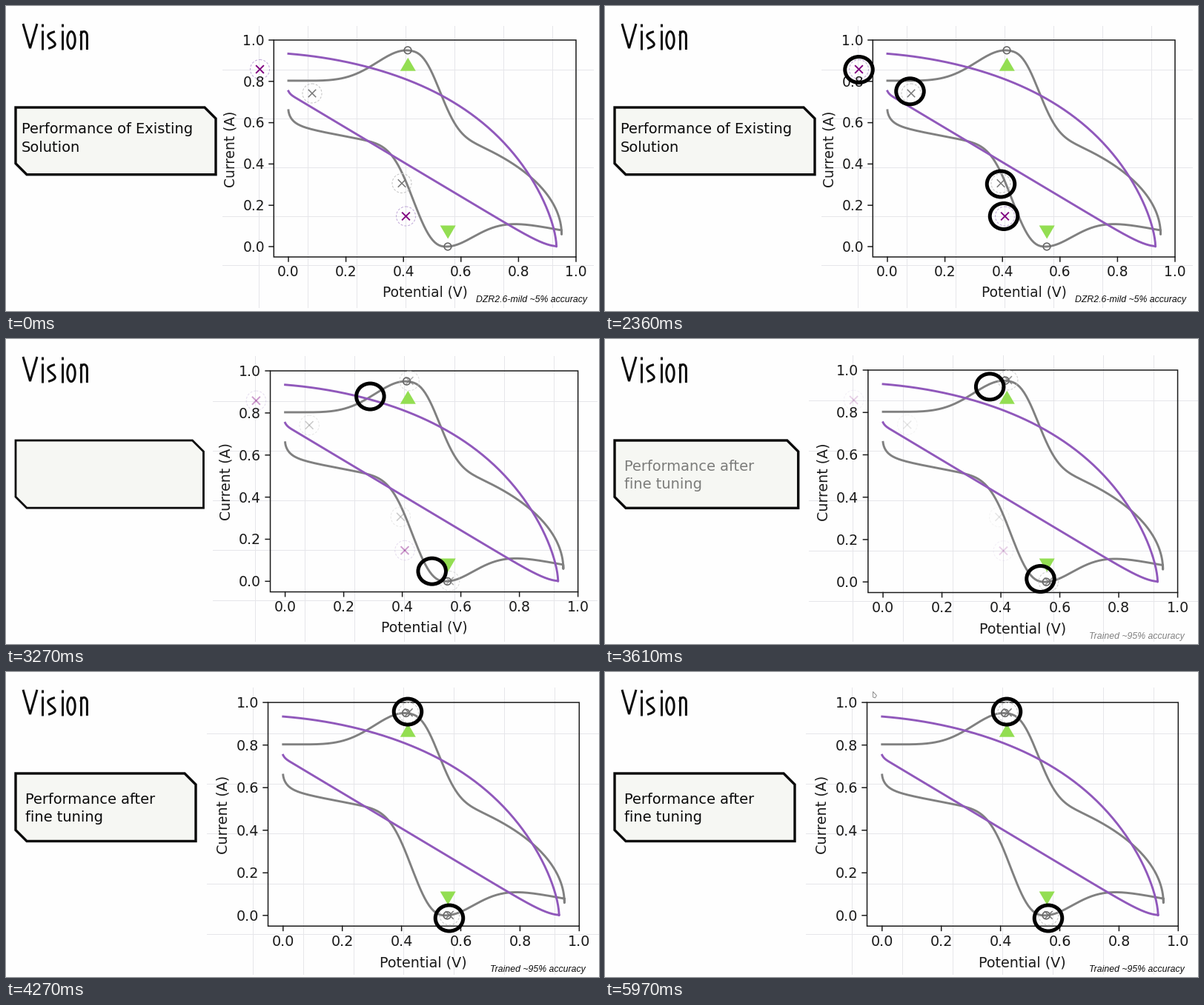
Animation of 800 by 412 pixels, one loop 6000 ms. Source, as a matplotlib script:

```python
import numpy as np
import matplotlib.pyplot as plt
from matplotlib.animation import FuncAnimation
from matplotlib.patches import Circle, Ellipse, Polygon, Rectangle
from matplotlib.transforms import Affine2D

W, H, STEP, FRAMES = 800, 412, 30, 200
PT = 0.72  # points per pixel at 100 dpi
GRAY, PURPLE, INK, LIME = "#808080", "#9058bb", "#0b0b0b", "#93de52"
EM = 18.6  # chart font size in pixels
X0, Y0, UX, UY = 381, 325, 388, 279  # chart zero point and unit lengths

fig = plt.figure(figsize=(W / 100, H / 100), dpi=100, facecolor="#fefefe")
ax = fig.add_axes([0, 0, 1, 1])
ax.set_xlim(0, W)
ax.set_ylim(H, 0)
ax.axis("off")

zoom = Affine2D()
chart = zoom + ax.transData


def lerp(a, b, p):
    return a + (b - a) * p


def ramp(t, start, end):
    return min(1.0, max(0.0, (t - start) / (end - start)))


def glide(t, start=2520, length=1755, rise=0.155):
    """Short acceleration followed by a long parabolic slow-down."""
    u = ramp(t, start, start + length)
    return u * u / rise if u < rise else 1 - (1 - u) ** 2 / (1 - rise)


def stroke(x, y, color, width, z=2, tr=None, **kw):
    return ax.plot(x, y, color=color, lw=width * PT, zorder=z,
                   transform=tr or ax.transData, **kw)[0]


def label(x, y, s, px, tr=None, **kw):
    kw = {"family": "DejaVu Sans", "va": "baseline", "color": INK, **kw}
    return ax.text(x, y, s, fontsize=px * PT, transform=tr or ax.transData,
                   zorder=3, **kw)


def note(x, y, s):
    return label(x, y, s, 12.2, ha="right", family="Liberation Sans",
                 style="italic")


def shape(patch, z):
    patch.set_zorder(z)
    return ax.add_patch(patch)


def title():
    """The word Vision in narrow pen strokes."""
    top, mid, base = 33, 46, 59

    def pen(x, y):
        stroke(x, y, INK, 3, solid_capstyle="butt", solid_joinstyle="miter")

    pen([23, 32.5, 42], [24, base - 2, 24])
    for x in (49, 75.5):
        pen([x, x], [top, base])
        pen([x, x], [24, 28])
    a = np.linspace(0.4, 3 * np.pi - 0.4, 60)
    pen(61.5 + 4.8 * np.cos(a), mid - 11.5 * np.cos(a / 3))
    a = np.linspace(0, 2 * np.pi, 60)
    pen(88 + 5.2 * np.cos(a), mid + 11.5 * np.sin(a))
    pen([101, 101], [top, base])
    a = np.linspace(0, np.pi, 30)
    pen(np.append(105.2 - 4.2 * np.cos(a), 109.4),
        np.append(40 - 5.5 * np.sin(a), base))


title()

# Panel and captions
panel = shape(Polygon([(0, 0)] * 6, fc="#f6f7f3", ec=INK), 1)
old_text = [label(21, 172.3, "Performance of Existing", 19.4),
            label(21, 196.8, "Solution", 19.4),
            note(784, 400, "DZR2.6-mild ~5% accuracy")]
new_text = [label(25.5, 177.5, "Performance after", 19.4),
            label(25.5, 202, "fine tuning", 19.4),
            note(782, 405, "Trained ~95% accuracy")]

# Background grid
GRID_X = 341 + 66 * np.arange(7)
GRID_Y = 86.2 + 65.9 * np.arange(5)
columns = [stroke([], [], "#e6e6ea", 1, 0.5) for _ in GRID_X]
rows = [stroke([], [], "#e6e6ea", 1, 0.5) for _ in GRID_Y]

# Chart frame, ticks and labels
EDGE = "#1a1a1a"
shape(Rectangle((361.3, 46), 407.7, 293, fill=False, ec=EDGE, lw=1.5 * PT,
                transform=chart, snap=False), 2.5)
words = []
for v in np.arange(6) / 5:
    x, y = X0 + UX * v, Y0 - UY * v
    stroke([x, x], [339, 345], EDGE, 1.5, tr=chart, snap=False)
    stroke([355, 361], [y, y], EDGE, 1.5, tr=chart, snap=False)
    words += [label(x, 365, f"{v:.1f}", EM, chart, ha="center", color=EDGE),
              label(349, y + 6.8, f"{v:.1f}", EM, chart, ha="right",
                    color=EDGE)]
words += [label(565, 392.3, "Potential (V)", EM, chart, ha="center",
                color=EDGE),
          label(303, 193, "Current (A)", EM, chart, ha="center", va="center",
                rotation=90, color=EDGE)]


# Current as a function of potential, forward and return sweeps
def bell(x, mid, left, right):
    """Lopsided bell; each side is (width, power)."""
    d = x - mid
    w, n = (np.where(d < 0, a, b) for a, b in zip(left, right))
    return np.exp(-np.abs(d / w) ** n)


def gray_forward(x):
    floor = np.where(x < 0.43, 0.124, -0.02)
    peak = floor + (0.333 - floor) * bell(x, 0.43, (0.165, 2), (0.1185, 2.5))
    return 0.079 + 0.6 * np.sqrt(1 - (x / 0.95) ** 2) + peak


def gray_back(x):
    base = 0.585 - 0.26 * x - np.where(x < 0.549, 0, 0.259)
    dip = 1 - bell(x, 0.549, (0.1366, 2.5), (0.158, 2))
    return base * dip + 0.075 * np.exp(-17 * x ** 0.7)


def purple_forward(x):
    r = x / 0.932
    return 0.934 * (1 - 0.22 * r - 0.78 * r * r) ** (0.5 + 0.1 * r ** 4)


def purple_back(x):
    return (0.741 - 0.831 * x + 0.0355 * (x / 0.932) ** 20
            + 0.012 * np.exp(-x / 0.006))


sweep = (1 - np.cos(np.linspace(0, np.pi, 200))) / 2
for forward, back, end, color in ((gray_forward, gray_back, 0.95, GRAY),
                                  (purple_forward, purple_back, 0.932, PURPLE)):
    x = end * sweep
    stroke(X0 + UX * np.append(x, x[::-1]),
           Y0 - UY * np.append(forward(x), back(x[::-1])),
           color, 2.9, 2.2, chart, solid_joinstyle="round")
for x, y in ((542, 59.8), (596, 325)):
    shape(Circle((x, y), 4.8, fill=False, ec="#666666", lw=1.6 * PT,
                 transform=chart), 2.6)


def cross(x, y, color="#777777", halo="#c4c4c4", width=1.5):
    """An x mark inside a dashed circle."""
    arm = np.array([-4.7, 4.7])
    arms = [stroke(x + arm, y + s * arm, color, width, 2.8, chart)
            for s in (1, -1)]
    ring = Circle((x, y), 13, fill=False, ec=halo, lw=PT, ls=(0, (3, 2)),
                  transform=chart)
    return arms + [shape(ring, 2.7)]


violet = ("#800080", "#c0a8d8", 1.9)
old_marks = (cross(342.5, 85.5, *violet) + cross(539.5, 284, *violet)
             + cross(413, 118) + cross(534, 239.5))
new_marks = cross(545.5, 59.2) + cross(599, 324.6)


def arrow(x, tip, base):
    shape(Polygon([(x, tip), (x - 10.5, base), (x + 10.5, base)],
                  fc=LIME, ec="none"), 4)


arrow(542.3, 69.8, 87.7)
arrow(596.2, 314.5, 296.5)

# Highlight rings: start, and end for those that travel
ROUTES = [((342.5, 86), None), ((411.5, 115.3), (542, 53.6)),
          ((534, 240.5), None), ((538, 284), (598, 332.5))]
rings = [shape(Ellipse(a, 37.5, 35, fill=False, ec="black", lw=5 * PT), 5)
         for a, _ in ROUTES]

pointer = shape(Polygon([(361.5, 26.5), (361.5, 34), (364.5, 35),
                         (366.4, 31.8)], fc="white", ec="#777777",
                        lw=0.8 * PT), 6)


def fade(items, alpha):
    for item in items:
        item.set_alpha(alpha)
        item.set_visible(alpha > 0)


def update(i):
    t = i * STEP
    p = glide(t)
    sx, sy = lerp(1, 1.0297, p), lerp(1, 1.031, p)
    ox, oy = lerp(X0, 373.8, p), lerp(Y0, 328.8, p)
    zoom.clear().translate(-X0, -Y0).scale(sx, sy).translate(ox, oy)
    for word in words:
        word.set_fontsize(EM * PT * sx)

    left, right = lerp(292, 271, p), lerp(792, 800, p)
    top, bottom = lerp(27, 21, p), lerp(407, 408, p)
    for line, x in zip(columns, ox + (GRID_X - X0) * sx):
        line.set_data([x, x], [top, bottom])
    for line, y in zip(rows, oy + (GRID_Y - Y0) * sy):
        line.set_data([left, right], [y, y])

    gone = 1 - ramp(t, 2520, 3000)
    came = ramp(t, 3330, 3850)
    fade(old_text, gone)
    fade(new_text, came)
    fade(old_marks, 1 - p)
    fade(new_marks, p)

    r, b = lerp(283, 256, p), lerp(227.7, 228.5, p)
    panel.set_xy([(13, 137), (r - 15, 137), (r, 152), (r, b), (28, b),
                  (13, b - 15)])
    panel.set_linewidth((2.8 + 0.6 * min(1, 2 * max(gone, came))) * PT)

    shown = ramp(t, 0, 540)
    for ring, (a, z) in zip(rings, ROUTES):
        if z:
            ring.set_center((lerp(a[0], z[0], p), lerp(a[1], z[1], p)))
        fade([ring], shown if z else shown * gone)
    pointer.set_visible(t >= 5310)
    return []


anim = FuncAnimation(fig, update, frames=FRAMES, interval=STEP, repeat=True,
                     repeat_delay=0, blit=False)
plt.show()
```
